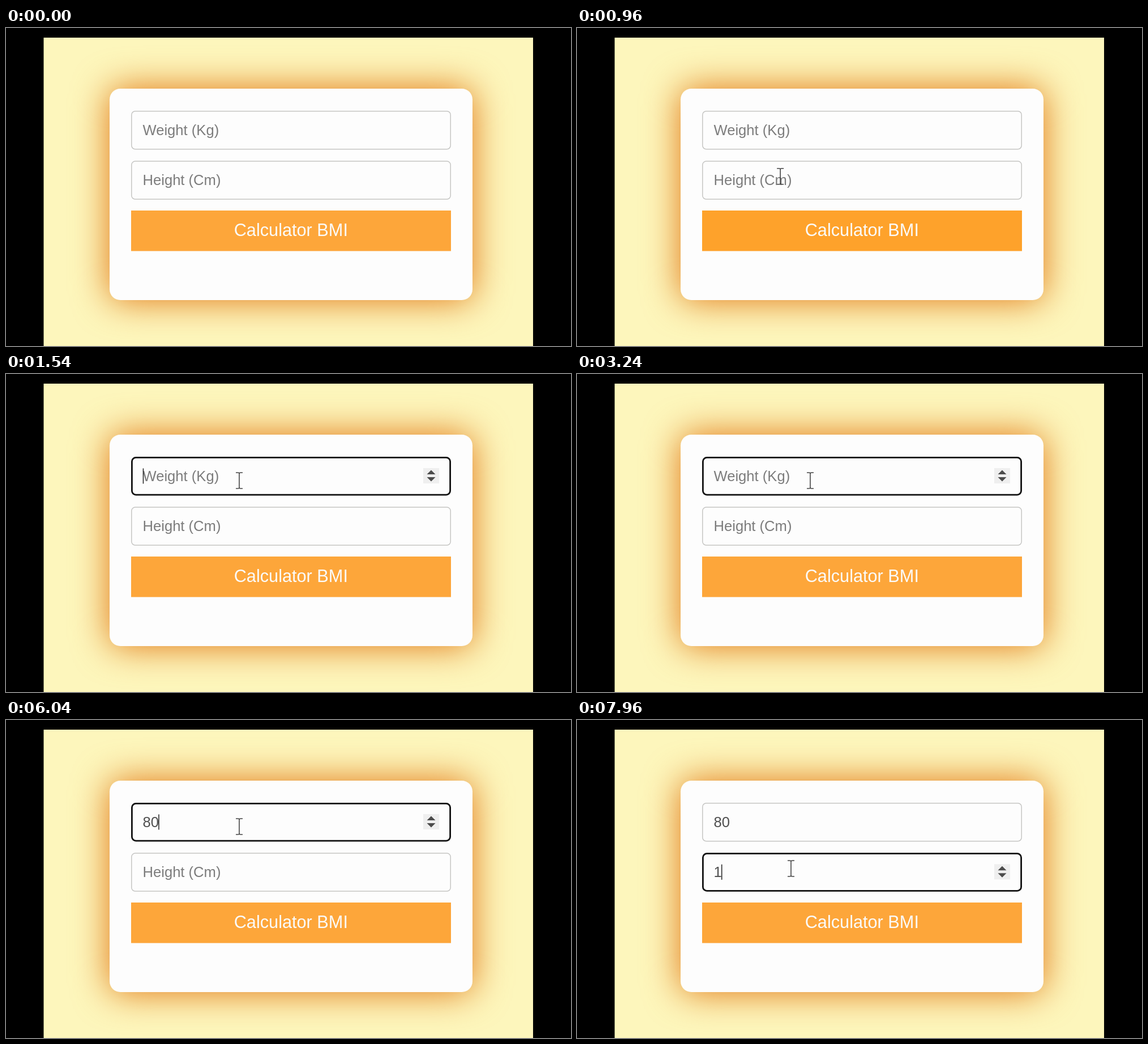
Recreate the animation shown at these times as an HTML page. Size 998x561 px, loop 8000 ms.

```html
<!DOCTYPE html>
<html lang="en">
<head>
<meta charset="utf-8">
<title>BMI form</title>
<style>
  html, body { margin: 0; width: 100%; height: 100%; overflow: hidden; background: #000; }
  svg { display: block; width: 998px; height: 561px; }
  text { font-family: "Liberation Sans", Arial, sans-serif; font-size: 25.6px; }
  .shadow { fill: #e0720c; filter: blur(32px); }
  .box { fill: #fdfdfd; }
  .spin { fill: #efefef; }
  .tri { fill: #4c4c4c; }
  .caret { fill: #222; }
  .beam { fill: none; stroke: #444; stroke-width: 1.6; }
  .arrow { fill: #fff; stroke: #333; stroke-width: 1.4; stroke-linejoin: round; }
</style>
</head>
<body>
<svg viewBox="0 0 998 561">
  <defs>
    <clipPath id="page"><rect x="66.5" y="17" width="864.5" height="544"/></clipPath>
    <g id="spinner">
      <rect class="spin" x="737" y="20" width="28" height="27"/>
      <path class="tri" d="M743.5 31l7.5-7.5 7.5 7.5zM743.5 36l7.5 7.5 7.5-7.5z"/>
    </g>
  </defs>
  <g clip-path="url(#page)">
    <rect x="66" y="17" width="866" height="544" fill="#fdf6bc"/>
    <rect class="shadow" x="183" y="107" width="641" height="373" rx="19"/>
  </g>
  <rect x="183" y="107" width="641" height="373" rx="19" fill="#fdfdfd"/>
  <g id="fields"></g>
  <rect id="button" x="221" y="322" width="565" height="71.5"/>
  <text x="503.3" y="367" text-anchor="middle" fill="#fbfbfb" style="font-size:30.7px">Calculator BMI</text>
  <g id="pointer">
    <path class="arrow" d="M.7.7V31.5L7.7 25 12.3 35 17 33 12.5 23.3H21.2z"/>
    <path class="beam" d="M-6-14h4q2 0 2 2q0-2 2-2h4M0-12V12M-6 14h4q2 0 2-2q0 2 2 2h4"/>
  </g>
</svg>
<script>
const LOOP = 8000, DIGIT = 14.24, TEXT_X = 241.5;
const $ = id => document.getElementById(id);
const show = (el, on) => el.setAttribute('visibility', on ? 'visible' : 'hidden');

// time, x, y of the pointer's hot spot
const path = [
  [300, 100, 481], [720, 269, 349], [800, 285, 333], [960, 359, 262],
  [1320, 412, 188], [6400, 412, 188], [6660, 384, 225], [6840, 384, 225], [7080, 378, 262]
];

// keys: [time, value]; the field has focus from "focus" to "blur"
const fields = [
  { top: 146, hint: 'Weight (Kg)', focus: 1500, blur: 7200, keys: [[4300, '8'], [4760, '80']] },
  { top: 234.3, hint: 'Height (Cm)', focus: 7200, blur: LOOP, keys: [[7700, '1']] }
];

for (const f of fields) {
  const g = document.createElementNS('http://www.w3.org/2000/svg', 'g');
  g.setAttribute('transform', `translate(0 ${f.top})`);
  g.innerHTML = `<rect class="box"/><text x="${TEXT_X}" y="42.8"></text>
    <use href="#spinner"/><rect class="caret" y="20.5" width="1.5" height="27"/>`;
  $('fields').append(g);
  [f.box, f.text, f.spinner, f.caret] = g.children;
}

function pointerAt(t) {
  let i = 1;
  while (i < path.length - 1 && t > path[i][0]) i++;
  const [a, b] = [path[i - 1], path[i]];
  const k = Math.min(1, Math.max(0, (t - a[0]) / (b[0] - a[0])));
  return [a[1] + (b[1] - a[1]) * k, a[2] + (b[2] - a[2]) * k];
}

function drawField(f, t, hovered) {
  const focused = t >= f.focus && t < f.blur;
  const [since, value] = f.keys.filter(k => t >= k[0]).pop() || [f.focus, ''];
  const line = focused ? 2.8 : 1.5;
  const attrs = {
    x: 221 + line / 2, y: line / 2, width: 565 - line, height: 68.5 - line,
    rx: focused ? 7 : 6.5, stroke: focused ? '#101010' : '#c6c6c4', 'stroke-width': line
  };
  for (const name in attrs) f.box.setAttribute(name, attrs[name]);
  f.text.textContent = value || f.hint;
  f.text.setAttribute('fill', value ? '#505050' : '#7c7c7c');
  f.caret.setAttribute('x', TEXT_X + .2 + value.length * DIGIT - (value ? 1 : 0));
  show(f.caret, focused && (t - since) % 1000 < 500);
  show(f.spinner, focused || hovered && t > 1000);
}

function draw(t) {
  const [x, y] = pointerAt(t);
  const over = f => x > 221 && x < 786 && y > f.top && y < f.top + 68.5;
  const [arrow, beam] = $('pointer').children;
  const typing = fields.some(over), visible = t >= path[0][0];
  $('pointer').setAttribute('transform', `translate(${x} ${y})`);
  show(arrow, visible && !typing);
  show(beam, visible && typing);
  fields.forEach(f => drawField(f, t, over(f)));
  $('button').setAttribute('fill', t > 780 && t < 1040 ? '#fea22b' : '#fda63a');
}

const start = performance.now();
function tick() {
  draw((performance.now() - start) % LOOP);
  requestAnimationFrame(tick);
}
tick();
</script>
</body>
</html>
```
